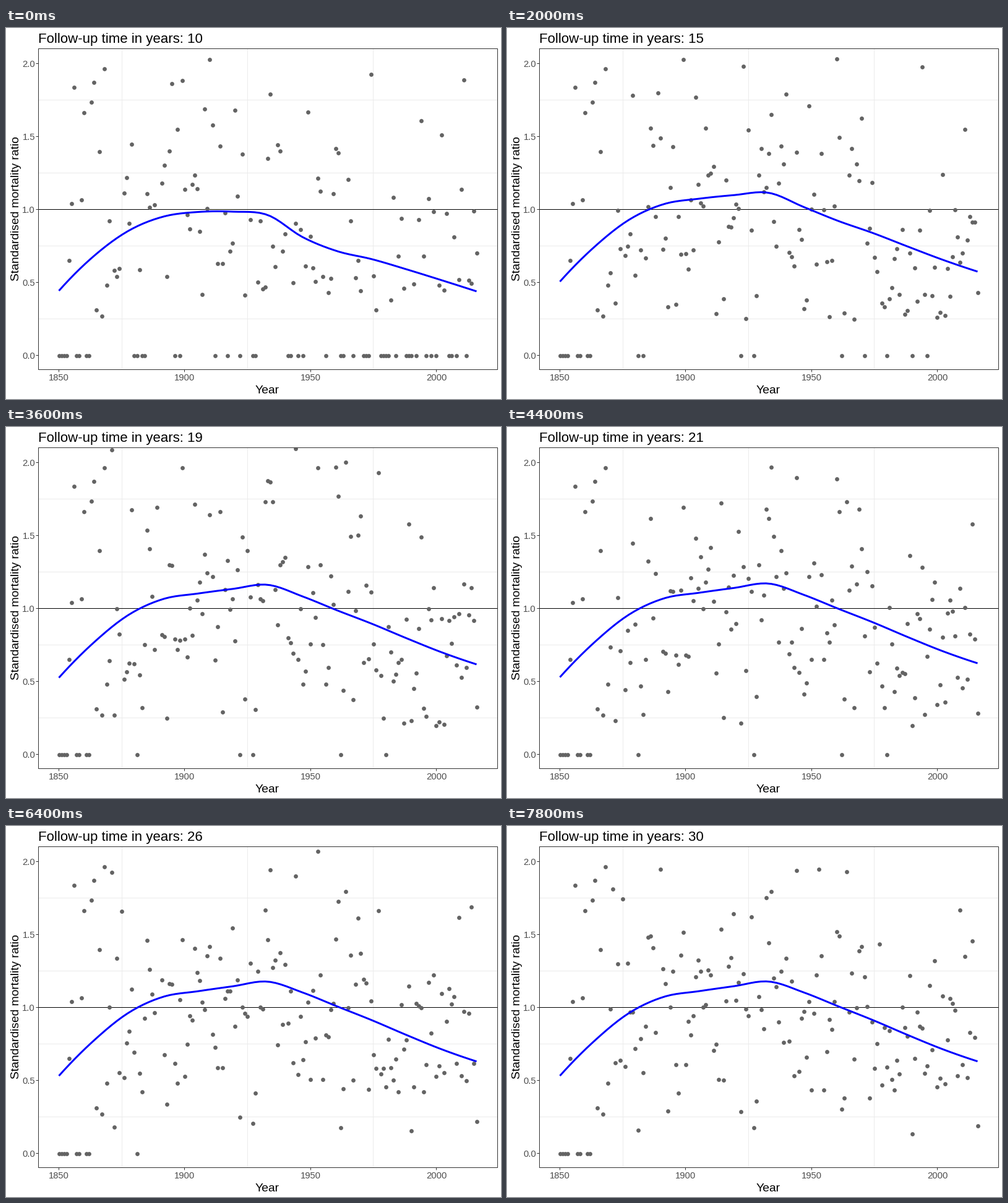
Write a matplotlib script that moves like this. It is 800 px wide and 600 px high and loops after 8 s.

```python
import numpy as np
import matplotlib.pyplot as plt
from matplotlib.animation import FuncAnimation
from matplotlib.patches import Rectangle

W, H, DPI = 800, 600, 100
PT = 72 / DPI
FRAMES, STEP = 40, 200
LEFT, RIGHT, TOP, BOTTOM = 52.5, 794.5, 33.5, 552.5
DARK, TICK_TEXT = "#333333", "#4d4d4d"
plt.rcParams["font.family"] = ["Liberation Sans", "DejaVu Sans"]

YEARS = np.arange(1850, 2017)
FOLLOW = np.arange(10, 31)
# Each whole follow-up year is reached exactly on one frame
REACHED = np.round((FOLLOW - 10) * (FRAMES - 1) / 20)

# Key points of the smooth at evenly spaced years, for 10 and 30 years
TREND_10 = np.array([.443, .68, .854, .951, .983, .985, .962,
                     .811, .714, .659, .589, .515, .439])
TREND_30 = np.array([.532, .773, .964, 1.074, 1.112, 1.146, 1.178,
                     1.104, 1.008, .913, .811, .714, .631])

# The first cohorts are too small to change; the others before 1870 are zero
SETTLED = {1854: .65, 1855: 1.04, 1856: 1.835, 1859: 1.065, 1860: 1.665,
           1863: 1.735, 1864: 1.87, 1865: .31, 1866: 1.395, 1867: .27,
           1868: 1.965, 1869: .48}


def px(year):
    return 85.5 + 675 / 166 * (year - 1850)


def py(ratio):
    return 529.5 - 236 * ratio


def spline(knots, n):
    """Hermite curve through evenly spaced knots."""
    u = np.linspace(0, len(knots) - 1, n)
    k = np.minimum(u.astype(int), len(knots) - 2)
    s = u - k
    m = np.gradient(knots, edge_order=2)
    return ((1 + 2 * s) * (1 - s) ** 2 * knots[k] + s * (1 - s) ** 2 * m[k]
            + s * s * (3 - 2 * s) * knots[k + 1] + s * s * (s - 1) * m[k + 1])


def trend(follow, n):
    """The smooth rises quickly at first, then settles."""
    p = 1 - np.exp(-((follow - 10) / 4.4) ** 1.3)
    return spline(TREND_10 + p * (TREND_30 - TREND_10), n)


def make_ratios():
    """Observed deaths over expected deaths, per follow-up year and cohort."""
    rng = np.random.default_rng(12)
    n = len(YEARS)
    size = 1.9 * rng.lognormal(0, .2, n)
    expected = size * (FOLLOW[:, None] / 10) ** 1.2
    mean = expected * np.array([trend(t, n) for t in FOLLOW])
    growth = np.diff(mean, axis=0, prepend=0)
    ratios = np.cumsum(rng.poisson(growth), axis=0) / expected
    ratios[:, YEARS < 1870] = 0
    for year, value in SETTLED.items():
        ratios[:, YEARS == year] = value
    return ratios


RATIOS = make_ratios()

fig = plt.figure(figsize=(W / DPI, H / DPI), dpi=DPI, facecolor="white")
ax = fig.add_axes([0, 0, 1, 1])
ax.set_xlim(0, W)
ax.set_ylim(H, 0)
ax.axis("off")


def centre(v):
    return np.floor(v) + .5


def rule(xs, ys, color, z):
    ax.plot(xs, ys, color=color, lw=PT, zorder=z, solid_capstyle="butt",
            snap=False)


def label(x, y, text, size, color="black", **kw):
    return ax.text(x, y, text, fontsize=size * PT, color=color,
                   va="baseline", **kw)


for year in (1875, 1925, 1975):
    rule([centre(px(year))] * 2, [TOP, BOTTOM], "#ebebeb", 1)
for ratio in (.25, .75, 1.25, 1.75):
    rule([LEFT, RIGHT], [centre(py(ratio))] * 2, "#ebebeb", 1)
rule([LEFT, RIGHT], [centre(py(1))] * 2, "black", 2)

for year in (1850, 1900, 1950, 2000):
    rule([centre(px(year))] * 2, [BOTTOM, BOTTOM + 4], DARK, 5)
    label(px(year), 570.5, str(year), 14.7, TICK_TEXT, ha="center")
for ratio in (0, .5, 1, 1.5, 2):
    rule([LEFT - 4, LEFT], [centre(py(ratio))] * 2, DARK, 5)
    label(47, py(ratio) + 5.5, f"{ratio:.1f}", 14.7, TICK_TEXT, ha="right")

label(422.5, 591, "Year", 19.3, ha="center")
label(21, 292.5, "Standardised mortality ratio", 19.3, ha="center",
      rotation=90, rotation_mode="anchor")
title = label(51.5, 24, "", 22.3)

panel = Rectangle((LEFT, TOP), RIGHT - LEFT, BOTTOM - TOP, fill=False,
                  ec=DARK, lw=PT, zorder=6, snap=False)
ax.add_patch(panel)
dots, = ax.plot([], [], "o", ms=6.8 * PT, mew=0, color="#636363", zorder=3)
curve, = ax.plot([], [], color="#0000ff", lw=3 * PT, zorder=4,
                 solid_capstyle="butt")
dots.set_clip_path(panel)


def draw(i):
    t = 10 + 20 * i / (FRAMES - 1)
    k = min(np.searchsorted(REACHED, i, side="right") - 1, len(FOLLOW) - 2)
    s = (i - REACHED[k]) / (REACHED[k + 1] - REACHED[k])
    dots.set_data(px(YEARS), py((1 - s) * RATIOS[k] + s * RATIOS[k + 1]))
    curve.set_data(np.linspace(px(1850), px(2016), 80), py(trend(t, 80)))
    title.set_text(f"Follow-up time in years: {round(t)}")
    return dots, curve, title


anim = FuncAnimation(fig, draw, frames=FRAMES, interval=STEP,
                     repeat=True, repeat_delay=0)
plt.show()
```
